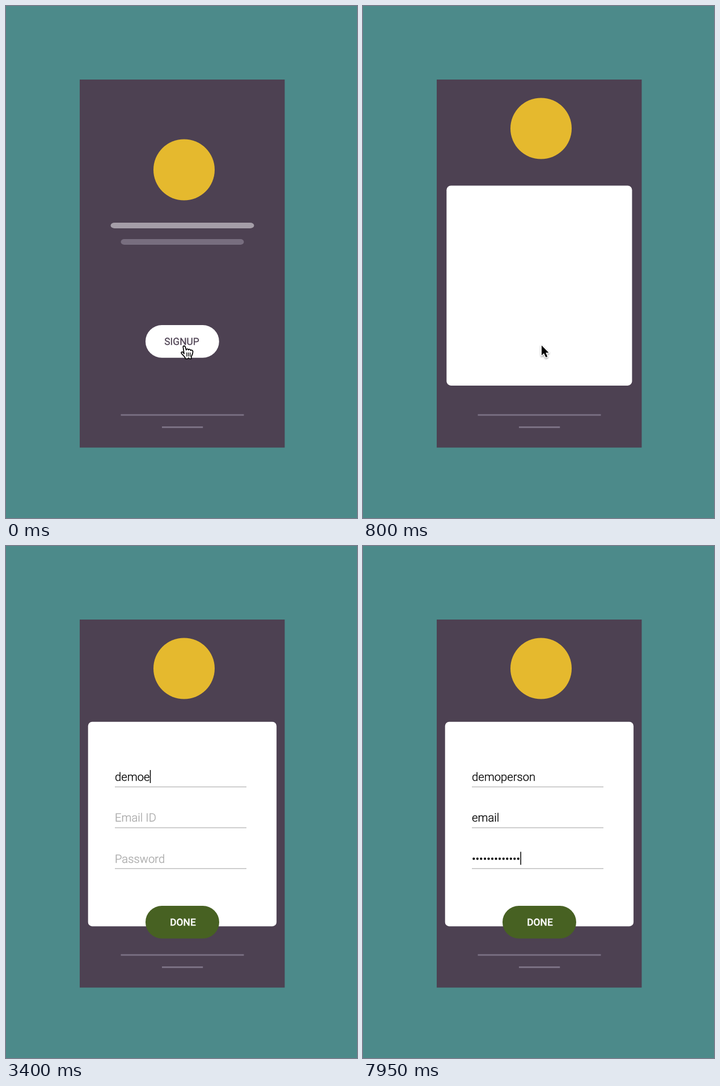
Animation, 619 px wide and 905 px high, one loop 8000 ms. Source, as an HTML page with a canvas:

```html
<!DOCTYPE html>
<html lang="en">
<head>
<meta charset="utf-8">
<title>Signup form</title>
<style>
  html, body { margin: 0; width: 100%; height: 100%; overflow: hidden; background: #4c8a8a; }
  canvas { display: block; }
</style>
</head>
<body>
<canvas id="stage" width="619" height="905"></canvas>
<script>
const ctx = document.getElementById('stage').getContext('2d');
ctx.textRendering = 'geometricPrecision';

const LOOP = 8000, FRAME = 50;
const BACKDROP = '#4c8a8a', PANEL = '#4d4152';
const FAMILY = 'Roboto, "Open Sans", sans-serif';
const FIELD_FONT = `300 20.24px ${FAMILY}`;
const USERNAME = 'demoperson';

const HAND = new Path2D('M6 14.5 L4.4 3.2 C4 .5 7.4 0 8.2 2.6 L9.8 8 C10.2 5.6 13.4 5.6 13.8 8 ' +
  'C14.6 6 17.2 6.4 17.6 8.8 C19 7.4 21.6 8.4 21.6 11 C21.6 15 20 17 18.8 19.6 L18.6 23.5 H15.6 ' +
  'L14 22 L12.5 23.5 H8.6 C8 20 4 17.5 1.4 14 C.2 12 2.4 10.8 4 12 Z');
const FINGERS = new Path2D('M10.8 13 V19 M13.8 13 V19 M16.8 13 V19');
const ARROW = new Path2D('M0 0 V17.5 L4 13.8 L7.5 21 L10.3 19.7 L7.2 12.7 H12.5 Z');
const BEAM = new Path2D('M-3 -10 Q0 -10 0 -8 Q0 -10 3 -10 M0 -8 V8 M-3 10 Q0 10 0 8 Q0 10 3 10');

const clamp = x => Math.min(1, Math.max(0, x));
const mix = (a, b, p) => a + (b - a) * p;
const bezier = (u, a, b) => 3 * u * (1 - u) ** 2 * a + 3 * u * u * (1 - u) * b + u ** 3;

// The CSS "ease" curve, solved by bisection
function ease(x) {
  if (x <= 0 || x >= 1) return clamp(x);
  let low = 0, high = 1;
  for (let i = 0; i < 24; i++) {
    const mid = (low + high) / 2;
    if (bezier(mid, .25, .25) < x) low = mid; else high = mid;
  }
  return bezier(low, .1, 1);
}
const progress = (t, start, duration) => ease((t - start) / duration);
const typedCount = (t, start, step, max) =>
  Math.min(max, Math.max(0, Math.floor((t - start) / step) + 1));

function box(x, y, w, h, r, color, alpha = 1) {
  ctx.globalAlpha = alpha;
  ctx.fillStyle = color;
  ctx.beginPath();
  ctx.roundRect(x, y, w, h, r);
  ctx.fill();
  ctx.globalAlpha = 1;
}

// A hairline outline gives the text its slightly heavier strokes
function label(text, x, y, font, color, alpha = 1, align = 'left') {
  ctx.globalAlpha = alpha;
  ctx.font = font;
  ctx.fillStyle = ctx.strokeStyle = color;
  ctx.lineWidth = .3;
  ctx.textAlign = align;
  ctx.fillText(text, x, y);
  ctx.strokeText(text, x, y);
  ctx.globalAlpha = 1;
}

function usernameAt(t) {
  if (t < 3500) return 'demoe'.slice(0, typedCount(t, 2500, 212, 5));
  return USERNAME.slice(0, 4 + typedCount(t, 3630, 130, 6));
}

function field(y, placeholder, value, focused, alpha) {
  box(192, y + 10, 232, 1.45, 0, '#bfbfbf', alpha);
  label(value || placeholder, 192, y, FIELD_FONT, value ? '#000' : '#a9a9a9', alpha);
  if (focused) {
    ctx.font = FIELD_FONT;
    box(192.3 + ctx.measureText(value).width, y - 19, 1.5, 23, 0, '#000');
  }
}

function drawForm(t) {
  const alpha = progress(t, 900, 250);
  if (!alpha) return;
  const focus = t < 2000 ? -1 : t < 4600 ? 0 : t < 6250 ? 1 : 2;
  const values = [
    usernameAt(t),
    'email'.slice(0, typedCount(t, 4800, 160, 5)),
    '•'.repeat(typedCount(t, 6750, 96, 13))
  ];
  ['Username', 'Email ID', 'Password'].forEach((name, i) =>
    field(415 + i * 72.3, name, values[i], focus === i, alpha));

  const grow = progress(t, 1110, 500);
  if (grow) box(311 - 65 * grow, 636, 130 * grow, 57.8, 29 * grow, '#476122');
  label('DONE', 312, 671, `500 17.35px ${FAMILY}`, '#fff', progress(t, 1500, 250), 'center');
}

function drawCursor(t) {
  if (t >= 2450) return;
  const toForm = progress(t, 850, 330), toField = progress(t, 1250, 350);
  const x = mix(mix(315, 279, toForm), 270, toField);
  const y = mix(mix(600, 369, toForm), 408, toField);
  ctx.save();
  ctx.lineJoin = ctx.lineCap = 'round';
  if (t < 420) {
    ctx.translate(308, 600);
    ctx.fillStyle = '#fff';
    ctx.strokeStyle = '#000';
    ctx.lineWidth = 1.7;
    ctx.fill(HAND);
    ctx.stroke(HAND);
    ctx.lineWidth = 1.3;
    ctx.stroke(FINGERS);
  } else if (toField > .7) {
    ctx.translate(x, y);
    ctx.strokeStyle = '#222';
    ctx.lineWidth = 1.4;
    ctx.stroke(BEAM);
  } else {
    ctx.translate(x, y);
    ctx.shadowColor = 'rgba(0,0,0,.4)';
    ctx.shadowBlur = 3;
    ctx.shadowOffsetY = 1.5;
    ctx.strokeStyle = '#fff';
    ctx.lineWidth = 3;
    ctx.stroke(ARROW);
    ctx.shadowColor = 'transparent';
    ctx.fillStyle = '#000';
    ctx.fill(ARROW);
  }
  ctx.restore();
}

function draw(t) {
  box(0, 0, 619, 905, 0, BACKDROP);
  box(130, 130, 361.5, 650.5, 0, PANEL);

  const lift = progress(t, 400, 285);
  box(260, mix(235.5, 162.5, lift), 108, 108, 54, '#e5b92e');
  box(184.5, 383, 253, 10, [{ x: 7, y: 5 }], '#a59ea8', 1 - lift);
  box(202.5, 412, 217, 10, [{ x: 6, y: 5 }], '#786e7f', 1 - lift);
  box(202.5, 721.4, 217, 2.9, 0, '#7b7184');
  box(275, 743, 72.3, 2.9, 0, '#7b7184');

  const open = progress(t, 403, 500);
  const left = mix(246, 144.7, open), top = mix(564, 310.8, open);
  const bottom = mix(621.8, 672.2, open);
  box(left, top, 2 * (310.9 - left), bottom - top, mix(28.9, 7.2, open), '#fff');
  label('SIGNUP', 310, 598.5, `400 17.35px ${FAMILY}`, PANEL,
    1 - progress(t, 400, 150), 'center');

  drawForm(t);
  drawCursor(t);
}

function tick() {
  const t = performance.now() % LOOP;
  draw(t - t % FRAME);
  requestAnimationFrame(tick);
}
tick();
</script>
</body>
</html>
```
